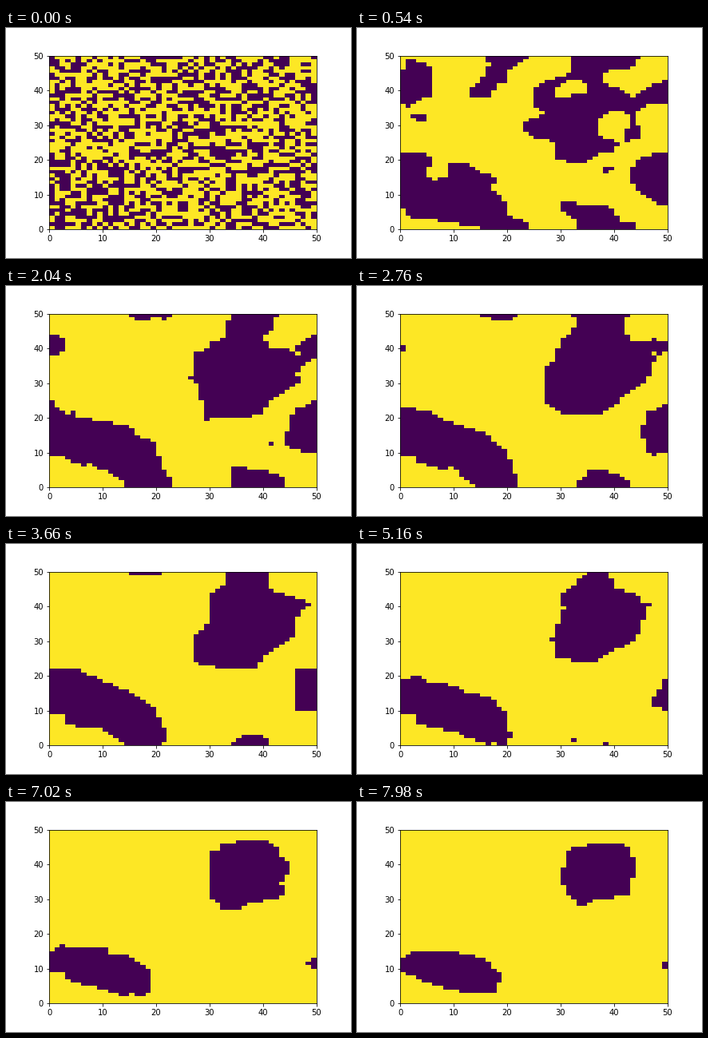
Recreate the animation shown at these times as a matplotlib script. Size 432 by 288 pixels, loop 8 s.

```python
import numpy as np
import matplotlib.pyplot as plt
from matplotlib.animation import FuncAnimation
from matplotlib.path import Path

N = 50            # cells per side, the lattice wraps around
STEP = 3          # animation ticks (20 ms) per sweep
TICKS = 400
SWEEPS = (TICKS - 1) // STEP + 1

rng = np.random.default_rng(11)
row, col = np.mgrid[0:N, 0:N]
centres = np.column_stack([col.ravel(), row.ravel()]) + 0.5

# torus distance between any two cells
gap = np.abs(np.arange(N)[:, None] - np.arange(N)[None, :])
gap = np.minimum(gap, N - gap).astype(np.float32) ** 2
r, c = row.ravel(), col.ravel()
dist = np.sqrt(gap[r][:, r] + gap[c][:, c])


def fill(points):
    """Cells inside a polygon that may run over the lattice edges."""
    path = Path(points + points[:1])
    inside = np.zeros(N * N, bool)
    for dx in (-N, 0, N):
        for dy in (-N, 0, N):
            inside |= path.contains_points(centres + (dx, dy))
    return inside


def domains(*outlines):
    """Signed distance to the domain walls, positive inside."""
    mask = np.any([fill(p) for p in outlines], axis=0)
    d = np.empty(N * N)
    d[mask] = dist[mask][:, ~mask].min(axis=1) - 0.5
    d[~mask] = 0.5 - dist[~mask][:, mask].min(axis=1)
    return d.reshape(N, N)


def blur(field, sigma):
    """Periodic Gaussian blur, scaled to zero mean and unit spread."""
    f = np.fft.fftfreq(N)
    k2 = f[:, None] ** 2 + f[None, :] ** 2
    out = np.fft.ifft2(np.fft.fft2(field) * np.exp(-2 * (np.pi * sigma) ** 2 * k2)).real
    out -= out.mean()
    return out / out.std()


# rough outlines of the long band and the big blob as they shrink
FORMED, MIDDLE, LAST = 22, 61, 133
formed = domains(
    [(-2, 26), (2, 26), (3, 21), (14, 18), (20, 13), (21, 5), (25, 1),
     (25, -1), (17, -3), (10, 6), (-3, 10.5), (-6, 12), (-5, 20)],
    [(33, 57), (38, 57), (45, 54), (45, 50), (40, 43), (40, 39), (47, 38),
     (47, 43), (50, 46), (53, 46), (55, 44), (55, 39), (47, 33), (47, 30),
     (38, 19), (29, 19), (28, 30), (26, 31), (26, 40), (33, 41)])
middle = domains(
    [(-4, 22), (5, 22), (15, 15.5), (20, 10), (22, 3), (21, -1), (16, -1),
     (10, 4.5), (3, 6), (3, 9), (-4, 10)],
    [(33, 50), (37, 53), (40, 53), (41, 51), (41, 45), (49, 41), (46, 36),
     (46, 31), (40, 25), (39, 22), (32, 22), (27, 24), (27, 31), (30, 36),
     (30, 44), (33, 46)])
last = domains(
    [(-1, 11.8), (2, 14.6), (10, 15), (16, 13), (19, 8), (18, 3), (12, 3),
     (6, 5.5), (0, 9), (-1, 10)],
    [(31, 44), (36, 46), (42, 46), (44, 41), (43, 31), (37, 30), (34, 27),
     (31, 32), (30, 35)])

start = rng.normal(size=(N, N)) + 0.12 * np.sign(formed)
waves = [(w, blur(rng.normal(size=(N, N)), 1.2), blur(rng.normal(size=(N, N)), 1.2))
         for w in (0.25, 0.45, 0.8, 1.3)]


def jitter(k):
    """Restless domain walls: smooth noise that drifts with time."""
    return sum(a * np.cos(w * k) + b * np.sin(w * k) for w, a, b in waves) / 2


def coarsen(k):
    """Random spins growing into the first set of domains."""
    w = (k / FORMED) ** 1.5
    noise = blur(start, 0.62 * np.sqrt(k)) - 0.13
    return (1 - w) * noise + w * np.clip(formed, -5, 5) / 2.5


def shrink(k):
    """Domains melting away between the outlines."""
    if k < MIDDLE:
        u, a, b = (k - FORMED) / (MIDDLE - FORMED), formed, middle
    else:
        u, a, b = (k - MIDDLE) / (LAST - MIDDLE), middle, last
    return a + u * (b - a) + 0.3 * np.sin(np.pi * u) * jitter(k)


def lattice(k):
    up = (coarsen(k) if k < FORMED else shrink(k)) <= 0
    # heat now and then flips a lone cell
    if k > FORMED and rng.random() < 0.25:
        x, y = rng.integers(0, N, 2)
        up[y, x] = not up[y, x]
    return up.astype(float)


grids = [lattice(k) for k in range(SWEEPS)]

fig = plt.figure(figsize=(6, 4), dpi=72, facecolor="white")
fig.subplots_adjust(left=0.125, right=0.9, bottom=0.125, top=0.88)
ax = fig.add_subplot()
mesh = ax.pcolormesh(grids[0], cmap="viridis", vmin=0, vmax=1)
ticks = range(0, N + 1, 10)
ax.set(xlim=(0, N), ylim=(0, N), xticks=ticks, yticks=ticks)


def draw(n):
    mesh.set_array(grids[n // STEP])
    return (mesh,)


anim = FuncAnimation(fig, draw, frames=TICKS, interval=20, init_func=lambda: draw(0),
                     repeat=True, repeat_delay=0, blit=False)
plt.show()
```
